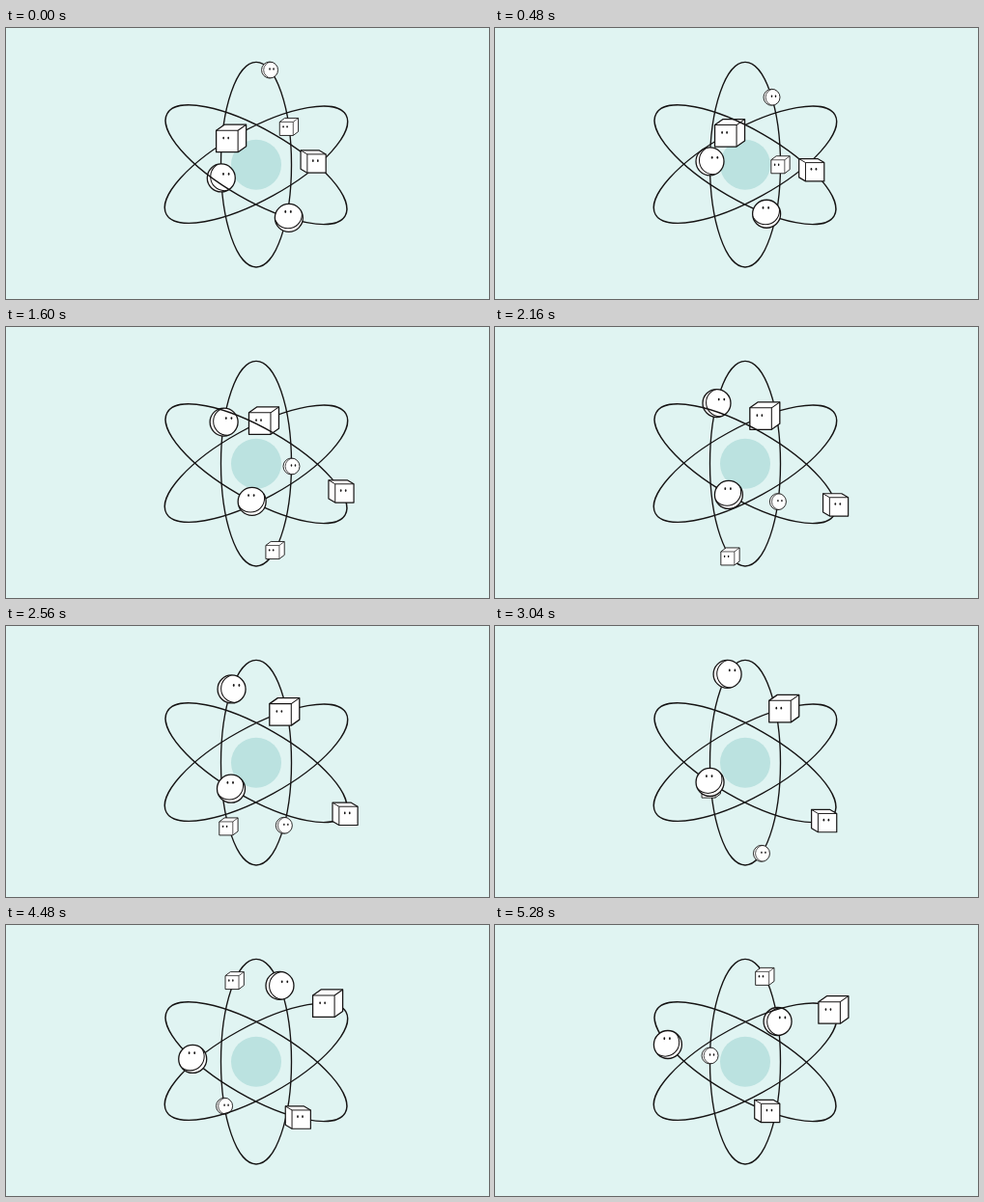
Animation of 500x281 px, one loop 5.36 s. Source, as an HTML page with a canvas:

```html
<!DOCTYPE html>
<html>
<head>
<meta charset="utf-8">
<style>
html, body { margin: 0; width: 100%; height: 100%; overflow: hidden; background: #e0f4f2; }
canvas { display: block; }
</style>
</head>
<body>
<canvas width="500" height="281"></canvas>
<script>
const LOOP = 5360, STEP = 80;
const CX = 259, CY = 141.7, RX = 36.5, RY = 106.3;
const INK = '#161414';
const ctx = document.querySelector('canvas').getContext('2d');

// Upright orbit, clockwise from its top; tilted orbits are rotations of it.
const track = document.createElementNS('http://www.w3.org/2000/svg', 'path');
track.setAttribute('d', `M0 ${-RY}A${RX} ${RY} 0 0 1 0 ${RY}A${RX} ${RY} 0 0 1 0 ${-RY}`);
const trackLength = track.getTotalLength();

// start and speed are distances along the orbit (px, px/s);
// after "turn" seconds the speed changes by "gain".
// Boxes: size of the front face and offset of the back face.
// Balls: radius, eye offset and the direction of the rim.
const orbits = [
  { tilt: 0, bodies: [
    { start: 79.6, speed: 82.2, turn: 3.5, gain: -5.2, size: 14, depth: [5.3, -4], line: 0.9 },
    { start: 16.8, speed: 65.6, r: 8.5, eyes: [2, -1], rim: [180, 180], line: 0.9 },
    { start: 343.2, speed: 35.6, turn: 3.5, gain: 12.3, r: 14.5, eyes: [5, -4], rim: [160, 186], line: 1.3 }
  ] },
  { tilt: 61, bodies: [
    { start: 347.5, speed: 23.8, size: 22.5, depth: [8.5, -6], line: 1.3 }
  ] },
  { tilt: 120, bodies: [
    { start: 406.8, speed: 27, size: 19.3, depth: [-6.8, -4], line: 1.2 },
    { start: 61.7, speed: 25.9, r: 14.5, eyes: [-0.8, -6.3], rim: [75, 40], line: 1.3 }
  ] }
];

function place(body, tilt, sec) {
  const extra = body.turn ? Math.max(0, sec - body.turn) * body.gain : 0;
  const p = track.getPointAtLength((body.start + body.speed * sec + extra) % trackLength);
  const a = tilt * Math.PI / 180, c = Math.cos(a), s = Math.sin(a);
  return [CX + p.x * c - p.y * s, CY + p.x * s + p.y * c];
}

function disc(x, y, r, color) {
  ctx.beginPath();
  ctx.arc(x, y, r, 0, 7);
  ctx.fillStyle = color;
  ctx.fill();
}

function drawEyes(x, y, gap, r) {
  ctx.fillStyle = INK;
  for (const side of [-1, 1]) {
    ctx.beginPath();
    ctx.ellipse(x + side * gap / 2, y, r, r * 1.6, 0, 0, 7);
    ctx.fill();
  }
}

function drawBall(b, x, y, progress) {
  disc(x, y, b.r, '#fff');
  ctx.stroke();
  const a = (b.rim[0] + (b.rim[1] - b.rim[0]) * progress) * Math.PI / 180;
  const shift = b.r * 0.25;
  ctx.save();
  ctx.clip();
  ctx.lineWidth *= 0.8;
  ctx.beginPath();
  ctx.arc(x - shift * Math.cos(a), y - shift * Math.sin(a), b.r, 0, 7);
  ctx.stroke();
  ctx.restore();
  const big = b.r > 10;
  drawEyes(x + b.eyes[0], y + b.eyes[1], big ? 5.6 : 4, big ? 0.9 : 0.75);
}

function drawBox(b, x, y) {
  const [dx, dy] = b.depth, h = b.size / 2;
  const fx = x - dx / 2, fy = y - dy / 2;
  const near = Math.sign(dx) * h;
  const outline = [
    [fx - near, fy + h], [fx - near, fy - h], [fx - near + dx, fy - h + dy],
    [fx + near + dx, fy - h + dy], [fx + near + dx, fy + h + dy], [fx + near, fy + h]
  ];
  ctx.beginPath();
  outline.forEach(p => ctx.lineTo(...p));
  ctx.closePath();
  ctx.fillStyle = '#fff';
  ctx.fill();
  ctx.stroke();
  ctx.lineWidth *= 0.8;
  ctx.beginPath();
  ctx.moveTo(fx - near, fy - h);
  ctx.lineTo(fx + near, fy - h);
  ctx.lineTo(fx + near, fy + h);
  ctx.moveTo(fx + near, fy - h);
  ctx.lineTo(fx + near + dx, fy - h + dy);
  ctx.stroke();
  const big = b.size > 15;
  drawEyes(fx - 1.2, fy - h * 0.3, big ? 5 : 4, big ? 0.85 : 0.75);
}

function draw(ms) {
  ctx.fillStyle = '#e0f4f2';
  ctx.fillRect(0, 0, 500, 281);
  disc(CX, CY, 26, '#bbe2e0');
  ctx.strokeStyle = INK;
  ctx.lineJoin = 'round';
  for (const { tilt, bodies } of orbits) {
    ctx.lineWidth = 1.35;
    ctx.beginPath();
    ctx.ellipse(CX, CY, RX, RY, tilt * Math.PI / 180, 0, 7);
    ctx.stroke();
    for (const body of bodies) {
      const [x, y] = place(body, tilt, ms / 1000);
      ctx.lineWidth = body.line;
      if (body.r) drawBall(body, x, y, ms / LOOP);
      else drawBox(body, x, y);
    }
  }
}

const begin = performance.now();
function tick() {
  const t = (performance.now() - begin) % LOOP;
  draw(Math.floor(t / STEP) * STEP);
  requestAnimationFrame(tick);
}
tick();
</script>
</body>
</html>
```
